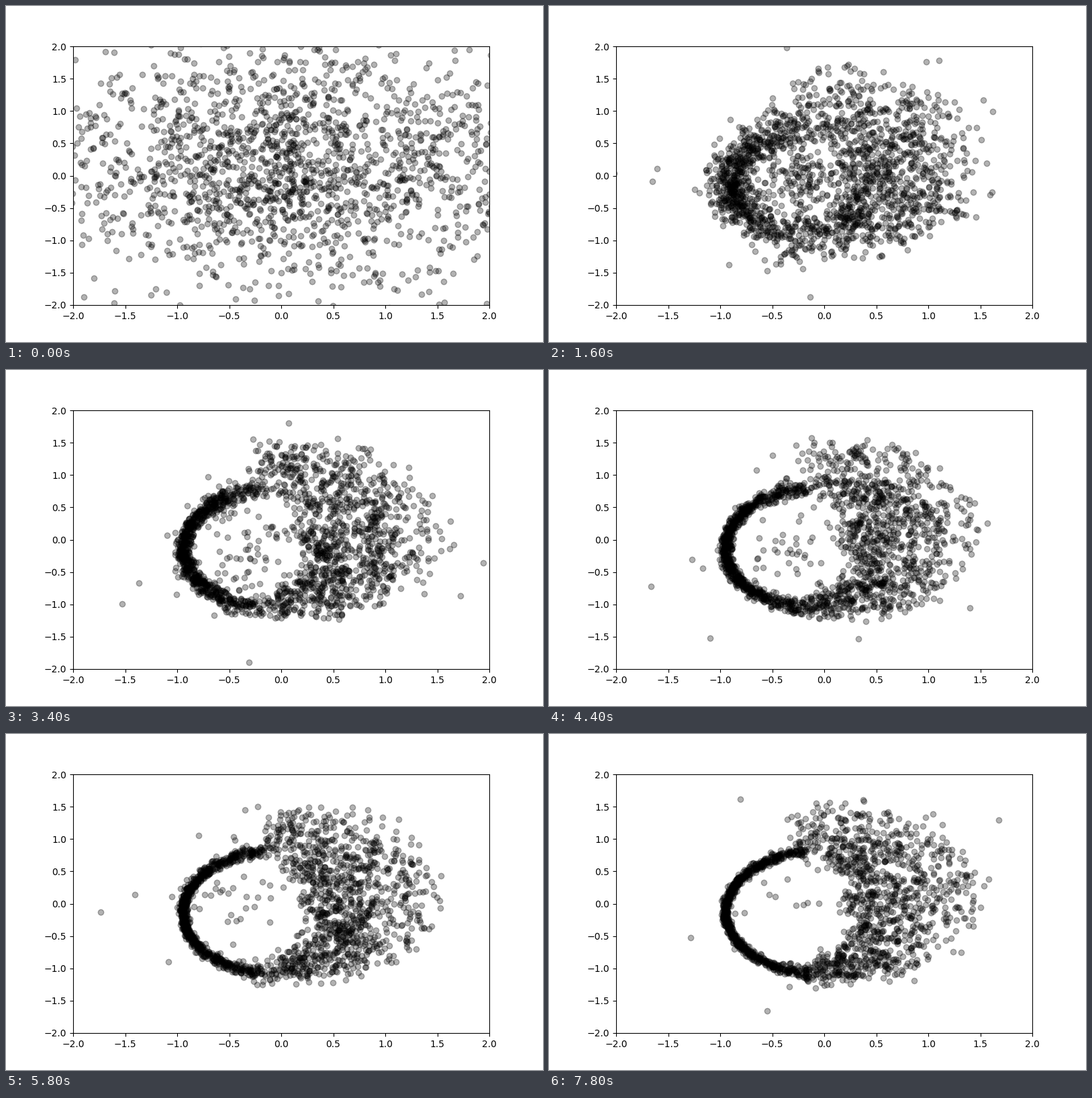
Animation, 800 px wide and 500 px high, one loop 8000 ms. Source, as a matplotlib script:

```python
import numpy as np
import matplotlib.pyplot as plt
from matplotlib.animation import FuncAnimation

FRAMES = 40
STEP_MS = 200
ARC_COUNT = 880
FAN_COUNT = 1120
CENTER = np.array([0.0, -0.13])


def arc_points(rng, f):
    """Left half of the ring: scattered early on, a thin line at the end."""
    u = 2 * rng.beta(1.4, 1.4, ARC_COUNT) - 1
    angle = np.pi + np.radians(82) * u
    width = (0.022 + 0.17 * np.exp(-f / 9)) * (0.75 + 1.3 * u**2)
    radius = 1 - 0.25 * np.exp(-f / 5)
    radius = radius + width * rng.standard_normal(ARC_COUNT)
    inside = rng.random(ARC_COUNT) < 0.005 + 0.6 * np.exp(-f / 8)
    radius = np.where(inside, rng.uniform(0.15, 1, ARC_COUNT), radius)
    return CENTER + np.column_stack((0.95 * radius * np.cos(angle),
                                     0.97 * radius * np.sin(angle)))


def fan_points(rng, f):
    """Right half: a broad crescent whose inner edge opens up with time."""
    angle = np.radians(rng.uniform(-97, 97, FAN_COUNT)
                       + 5 * rng.standard_normal(FAN_COUNT))
    c, s = np.cos(angle), np.sin(angle)
    inner = (0.18 + 0.55 * (1 - c) - 0.1 * s) * (1 - 0.75 * np.exp(-f / 10))
    outer = 1.4 + 0.2 * s + 0.15 * c
    radius = inner + (outer - inner) * rng.beta(1.5, 1.5, FAN_COUNT)
    pts = np.column_stack((radius * c, radius * s))
    blur = 0.06 + 0.1 * np.exp(-f / 8)
    return pts + blur * rng.standard_normal(pts.shape)


def clump(rng, pts, share, spread):
    """Move a share of the points close to other ones."""
    n = len(pts)
    moved = rng.random(n) < share
    near = pts[rng.integers(0, n, n)] + spread * rng.standard_normal(pts.shape)
    return np.where(moved[:, None], near, pts)


def sample(f):
    rng = np.random.default_rng(500 + f)
    fan = clump(rng, fan_points(rng, f), 0.25, 0.05)
    pts = np.vstack((arc_points(rng, f), fan))
    n = len(pts)

    # heavy-tailed noise that dies away, with an early lift
    tail = np.exp(0.35 * rng.standard_normal((n, 1)))
    noise = np.array([1.0, 0.72]) * np.exp(-f / 2.8) + 0.03 * np.exp(-f / 12)
    pts = pts + noise * tail * rng.standard_normal((n, 2))
    pts[:, 1] += 0.25 * np.exp(-f / 3)

    stray = rng.random((n, 1)) < 0.012 + 0.08 * np.exp(-f / 6)
    pts = pts + stray * 0.42 * rng.standard_normal((n, 2))
    pts = clump(rng, pts, 0.3 * np.exp(-f / 5), 0.06)
    return rng.permutation(pts)


fig, ax = plt.subplots(figsize=(8, 5), dpi=100)
ax.set_xlim(-2, 2)
ax.set_ylim(-2, 2)
dots = ax.scatter([], [], c="black", alpha=0.3)


def update(f):
    dots.set_offsets(sample(f))
    return (dots,)


anim = FuncAnimation(fig, update, frames=FRAMES, interval=STEP_MS,
                     repeat=True, repeat_delay=0)
plt.show()
```
